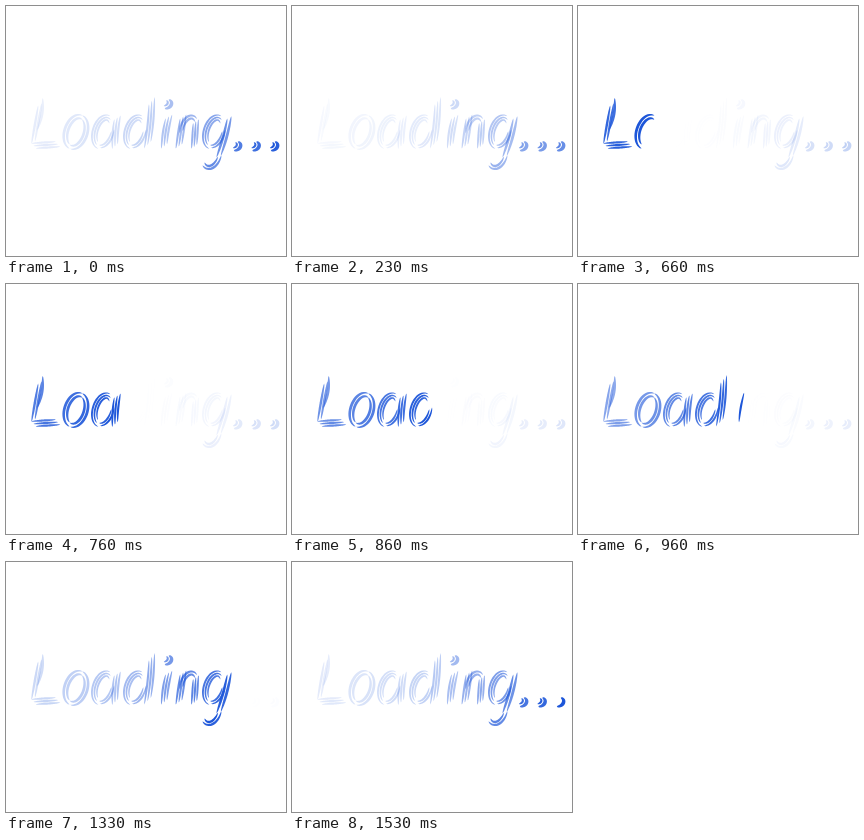
Write an HTML page with a canvas that moves like this. It is 280 px wide and 250 px high and loops after 1.56 s.

```html
<!DOCTYPE html>
<html lang="en">
<head>
<meta charset="utf-8">
<title>Loading</title>
<style>
  html, body { margin: 0; width: 100%; height: 100%; overflow: hidden; background: #fff; }
  canvas { display: block; }
</style>
</head>
<body>
<canvas id="stage" width="280" height="250"></canvas>
<script>
const ctx = document.getElementById('stage').getContext('2d');
const LOOP = 1560, START = 560, STEP = 100 / 3, FADE = 1600;
const BASELINE = 143, SLANT = 0.2;
const pieces = [];

// Upright centre lines; s runs from 0 to 1.
const line = (x0, y0, x1, y1, bow = 0) => s =>
  [x0 + (x1 - x0) * s + bow * Math.sin(Math.PI * s), y0 + (y1 - y0) * s];

const arc = (cx, cy, rx, ry, from, to) => s => {
  const angle = (from + (to - from) * s) * Math.PI / 180;
  return [cx + rx * Math.cos(angle), cy + ry * Math.sin(angle)];
};

const slanted = curve => s => {
  const [x, y] = curve(s);
  return [x + (BASELINE - y) * SLANT, y];
};

// Splits a stroke into staggered, tapered strands, one path each.
function brush(upright, width, count = 1) {
  const curve = slanted(upright), pitch = width / count, steps = 24;
  return Array.from({ length: count }, (_, k) => {
    const from = 0.07 * k, to = 1 - 0.07 * (count - 1 - k);
    const offset = (k - (count - 1) / 2) * pitch;
    const left = [], right = [];
    for (let j = 0; j <= steps; j++) {
      const s = from + (to - from) * j / steps;
      const [x, y] = curve(s);
      const [ax, ay] = curve(s - 0.01), [bx, by] = curve(s + 0.01);
      const len = Math.hypot(bx - ax, by - ay);
      const nx = (ay - by) / len, ny = (bx - ax) / len;
      const half = pitch * 0.4 * Math.max(0, Math.sin(Math.PI * j / steps)) ** 0.5;
      left.push([x + nx * (offset + half), y + ny * (offset + half)]);
      right.unshift([x + nx * (offset - half), y + ny * (offset - half)]);
    }
    const path = new Path2D();
    [...left, ...right].forEach(point => path.lineTo(...point));
    path.closePath();
    return path;
  });
}

// Strands of a letter appear evenly between two steps of the clock.
function letter(first, last, ...strokes) {
  const strands = strokes.flat();
  strands.forEach((path, i) => {
    const step = first + Math.round((last - first) * i / Math.max(1, strands.length - 1));
    pieces.push({ path, born: START + step * STEP });
  });
}

const bowl = x => [
  ...brush(arc(x, 126, 8.5, 14.5, -40, -260), 7.5, 3),
  ...brush(arc(x, 126, 9, 14.5, 100, -10), 5, 2)
];
const stem = (x0, y0, x1, bow = 0) => brush(line(x0, y0, x1, BASELINE, bow), 8, 3);
const dot = (x, y) => [
  ...brush(arc(x - 2, y, 5, 4.5, -75, 100), 4.5),
  ...brush(arc(x - 5, y - 1, 4, 3, -60, 80), 2.8)
];

letter(0, 2,
  brush(line(26.5, 92, 27.5, 124, 2), 3.6),
  brush(line(25, 97, 26, 138), 6, 2),
  brush(line(25, 140, 53, 138, 0), 8, 3));
letter(3, 4,
  brush(arc(66.5, 126, 10, 15.5, -60, -255), 7, 2),
  brush(arc(66.5, 126, 10, 15.5, 115, -75), 7, 2));
letter(5, 6, bowl(94), stem(105, 109, 109, -1));
letter(7, 11, bowl(126), stem(135.5, 91, 141, 1));
letter(12, 14, stem(156.5, 108, 158, -1), dot(153.5, 98));
letter(15, 17,
  stem(170.5, 108, 172.5),
  brush(arc(179, 123, 7.5, 12, 160, 320), 6, 2),
  brush(line(184, 113, 188, BASELINE, 0), 7.5, 3));
letter(18, 23,
  bowl(205),
  brush(line(217, 110, 214, 152, 1), 7, 2),
  brush(arc(206.5, 149, 8.5, 12.5, 0, 140), 6, 2));
for (let i = 0; i < 3; i++) letter(25 + 2 * i, 26 + 2 * i, dot(231 + 18.5 * i, 140));

function draw() {
  const now = performance.now() % LOOP;
  const idle = now < START;
  const origin = idle ? 0 : START, step = idle ? 71 : STEP;
  const t = origin + Math.floor((now - origin) / step) * step;
  ctx.globalAlpha = 1;
  ctx.fillStyle = '#fff';
  ctx.fillRect(0, 0, 280, 250);
  ctx.fillStyle = '#1d56d9';
  for (const { path, born } of pieces) {
    const age = (t - born + LOOP + 0.01) % LOOP;
    ctx.globalAlpha = (1 - age / FADE) ** 2.4;
    ctx.fill(path);
  }
  requestAnimationFrame(draw);
}
draw();
</script>
</body>
</html>
```
